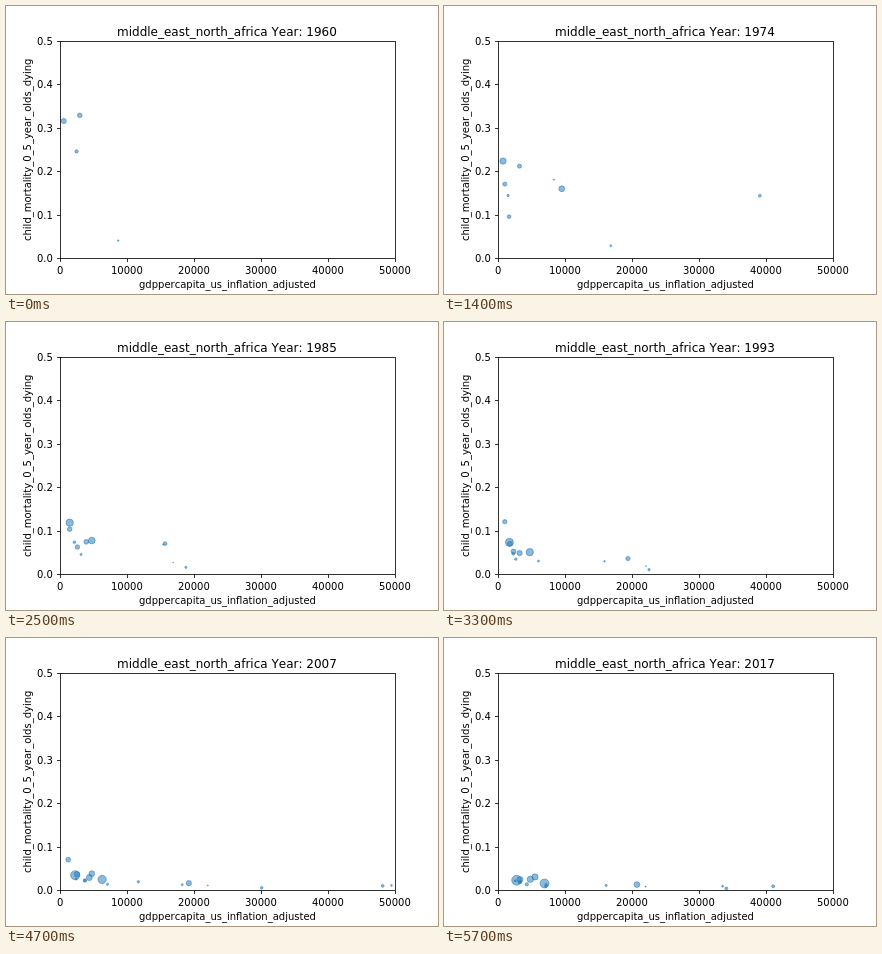
Recreate the animation shown at these times as an HTML page with a canvas. Size 432 px wide and 288 px high, loop 5800 ms.

```html
<!DOCTYPE html>
<html lang="en">
<head>
<meta charset="utf-8">
<title>Child mortality and income by year</title>
<style>
html, body { margin: 0; width: 100%; height: 100%; overflow: hidden; background: #fff; }
canvas { display: block; width: 432px; height: 288px; }
</style>
</head>
<body>
<canvas id="chart" width="432" height="288"></canvas>
<script>
const ctx = document.getElementById('chart').getContext('2d');
const FIRST = 1960, MIDDLE = 1985, LAST = 2017, STEP = 100;
const LEFT = 54, RIGHT = 388.8, TOP = 34.56, BOTTOM = 252;
const X_MAX = 50000, Y_MAX = 0.5;

const px = v => LEFT + (RIGHT - LEFT) * v / X_MAX;
const py = v => BOTTOM - (BOTTOM - TOP) * v / Y_MAX;
const mix = (a, b, k) => a * (b / a) ** k;
const span = (a, b, year) => (year - a) / (b - a);

// Millions of people: a share of the final size, growing a little faster each year.
function population({ people, share }, year) {
  return people * (share + (1 - share) * span(FIRST, LAST, year) ** 1.15);
}

// Mortality: slow start, then a decline that levels off.
function mortality({ early, middle, late, bend, ease }, year) {
  if (early && year < MIDDLE) return mix(early, middle, span(FIRST, MIDDLE, year) ** bend);
  return mix(middle, late, 1 - (1 - span(MIDDLE, LAST, year)) ** ease);
}

// Income: steady growth between turning points [year, value].
function income({ path }, year) {
  const i = Math.max(1, path.findIndex(p => p[0] >= year));
  const [y0, a] = path[i - 1], [y1, b] = path[i];
  return mix(a, b, span(y0, y1, year));
}

const base = { share: .27, bend: 1.8, ease: 1.2 };
const countries = [
  { name: 'Algeria', people: 41, early: .245, middle: .074, late: .0245, bend: 3.6, ease: 1.7,
    path: [[1960, 2480], [1985, 3930], [1994, 3150], [2007, 4380], [2017, 4830]] },
  { name: 'Bahrain', people: 1.5, share: .11, middle: .026, late: .0078,
    path: [[1980, 22600], [1985, 16900], [1993, 22100], [2017, 22050]] },
  { name: 'Egypt', people: 97, early: .315, middle: .118, late: .0225,
    path: [[1960, 560], [1974, 750], [1985, 1450], [2017, 2780]] },
  { name: 'Iran', people: 81, early: .328, middle: .077, late: .015, bend: 1.2, ease: 1.05,
    path: [[1960, 2950], [1974, 9520], [1985, 4750], [2000, 4740], [2007, 6290], [2017, 6950]] },
  { name: 'Iraq', people: 38, share: .2, early: .12, middle: .062, late: .03, ease: 1,
    path: [[1968, 1600], [1974, 1650], [1985, 2600], [1993, 2310], [2000, 4270], [2017, 5530]] },
  { name: 'Israel', people: 8.7, early: .04, middle: .0152, late: .0036,
    path: [[1960, 8700], [1974, 16850], [1985, 18800], [1993, 22550], [2000, 27600], [2017, 34100]] },
  { name: 'Jordan', people: 9.7, share: .1, middle: .045, late: .0175,
    path: [[1975, 1850], [1985, 3150], [1992, 2600], [2007, 3750], [2017, 3260]] },
  { name: 'Kuwait', people: 4.1, share: .1, middle: .0203, late: .0085,
    path: [[1995, 38500], [2000, 35700], [2007, 49500], [2009, 42300], [2017, 33550]] },
  { name: 'Lebanon', people: 6.1, middle: .05, late: .0085,
    path: [[1988, 3600], [1993, 6050], [2007, 7100], [2017, 7150]] },
  { name: 'Libya', people: 6.4, middle: .072, late: .0122,
    path: [[1999, 8700], [2007, 11700], [2010, 12100], [2011, 4600], [2012, 10200], [2017, 7200]] },
  { name: 'Morocco', people: 35.6, share: .35, early: .223, middle: .103, late: .024, ease: 1.1,
    path: [[1966, 800], [1985, 1450], [2017, 3280]] },
  { name: 'Oman', people: 4.7, share: .1, early: .306, middle: .068, late: .0105, ease: 2.1,
    path: [[1967, 4500], [1968, 8000], [1980, 8700], [1985, 15450], [1993, 15900], [2000, 18600], [2007, 18250], [2017, 16150]] },
  { name: 'Palestine', people: 4.7, middle: .0465, late: .021,
    path: [[1994, 2200], [2017, 2570]] },
  { name: 'Saudi Arabia', people: 33, share: .06, early: .211, middle: .07, late: .0125, ease: 1.75,
    path: [[1968, 21600], [1974, 39100], [1978, 37000], [1985, 15700], [1993, 19400], [2000, 18250], [2017, 20750]] },
  { name: 'Tunisia', people: 11.5, share: .37, early: .208, middle: .073, late: .013, ease: 1.05,
    path: [[1965, 1130], [1985, 2150], [1993, 2300], [2007, 3700], [2017, 4300]] },
  { name: 'United Arab Emirates', people: 9.4, share: .05, middle: .0122, late: .0085,
    path: [[2007, 48200], [2010, 35500], [2017, 41100]] },
  { name: 'Yemen', people: 28, middle: .17, late: .052,
    path: [[1990, 980], [2010, 1280], [2016, 700]] }
].map(c => ({ ...base, ...c }));

// Labels start on whole pixels; align is 0 for left, .5 for centre, 1 for right.
function text(str, x, y, align = .5, size = 10) {
  ctx.font = size + 'px "DejaVu Sans", sans-serif';
  ctx.fontKerning = 'none';
  ctx.fillText(str, Math.round(x - align * ctx.measureText(str).width), y);
}

function line(x0, y0, x1, y1) {
  ctx.beginPath();
  ctx.moveTo(x0, y0);
  ctx.lineTo(x1, y1);
  ctx.stroke();
}

function bubbles(year) {
  ctx.save();
  ctx.beginPath();
  ctx.rect(LEFT, TOP, RIGHT - LEFT, BOTTOM - TOP);
  ctx.clip();
  ctx.fillStyle = ctx.strokeStyle = 'rgba(31,119,180,.5)';
  ctx.lineWidth = 1;
  for (const c of countries) {
    if (year < c.path[0][0] || year > c.path.at(-1)[0]) continue;
    const r = Math.sqrt(population(c, year)) / 2;
    ctx.beginPath();
    ctx.arc(px(income(c, year)), py(mortality(c, year)), r, 0, Math.PI * 2);
    ctx.fill();
    ctx.stroke();
  }
  ctx.restore();
}

function axes() {
  const snap = v => Math.round(v) + .5;
  ctx.fillStyle = ctx.strokeStyle = '#000';
  ctx.lineWidth = .8;
  ctx.strokeRect(snap(LEFT), snap(TOP), snap(RIGHT) - snap(LEFT), snap(BOTTOM) - snap(TOP));
  for (let i = 0; i <= 5; i++) {
    const x = px(i * 10000), y = py(i / 10);
    line(snap(x), 252.5, snap(x), 256);
    line(51, snap(y), 54.5, snap(y));
    text(String(i * 10000), x, 268);
    text((i / 10).toFixed(1), 47, Math.round(y) + 4, 1);
  }
  text('gdppercapita_us_inflation_adjusted', 221.4, 282);
  ctx.save();
  ctx.translate(25, 144);
  ctx.rotate(-Math.PI / 2);
  text('child_mortality_0_5_year_olds_dying', 0, 0);
  ctx.restore();
}

function draw() {
  const year = FIRST + Math.floor(performance.now() / STEP) % (LAST - FIRST + 1);
  ctx.fillStyle = '#fff';
  ctx.fillRect(0, 0, 432, 288);
  bubbles(year);
  axes();
  text('middle_east_north_africa Year: ' + year, 221.4, 30, .5, 12);
  requestAnimationFrame(draw);
}
draw();
</script>
</body>
</html>
```
